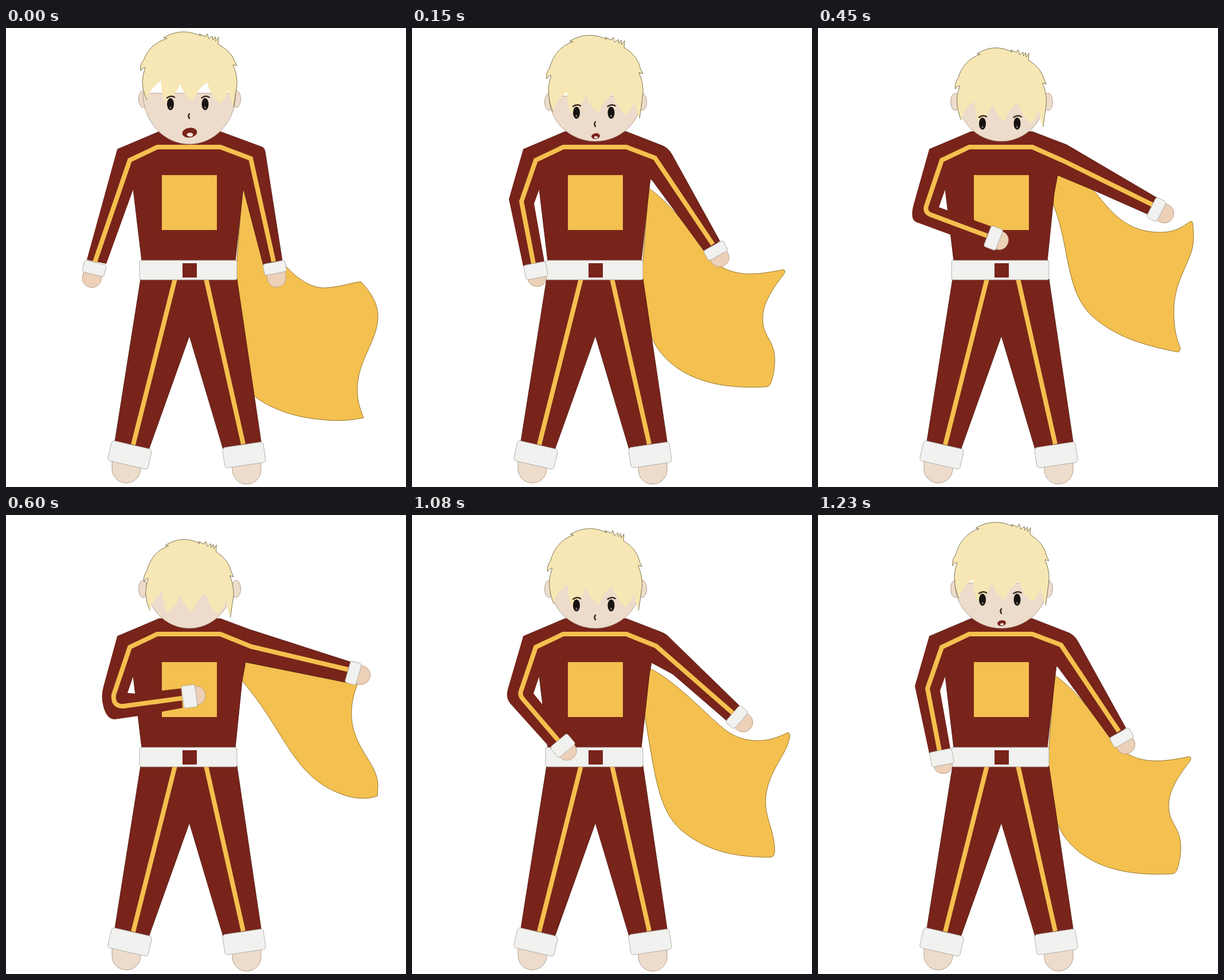
Write an HTML page that moves like this. It is 698x802 px and loops after 1380 ms.

```html
<!DOCTYPE html>
<html lang="en">
<head>
<meta charset="utf-8">
<title>Caped hero</title>
<style>
  html, body { margin: 0; width: 100%; height: 100%; overflow: hidden; background: #fff; }
  svg { display: block; width: 100%; height: 100%; }
  .suit { fill: #78241a; stroke: #4d130d; stroke-width: .8; }
  .stripe { fill: none; stroke: #f4c04f; stroke-width: 8; }
  .cape { fill: #f4c04f; stroke: #8a6a24; stroke-width: .9; }
  .white { fill: #f1f1ef; stroke: #a5a39f; stroke-width: .8; }
  .skin { fill: #eddccb; stroke: #a08b79; stroke-width: .8; }
  .hand { fill: #ecd0b7; stroke: #b3977f; stroke-width: .8; }
  .hair { fill: #f7e7b4; }
  .edge { fill: none; stroke: #7d7453; stroke-width: 1; }
  .brow { fill: none; stroke: #3b2b24; stroke-width: 2.6; stroke-linecap: round; }
</style>
</head>
<body>
<svg id="stage" viewBox="0 0 698 802"></svg>
<script>
const STEP = 150, LOOP = 1380;

// Cuffs are [x, y, angle, thickness, hand reach].
const poses = [
  {
    cape: 'M413,278 L470,400 L490,418 C515,445 540,455 556,454 C580,453 600,446 619,443 C640,465 650,485 649,507 C647,550 613,580 613,633 C613,655 620,670 624,681 C600,686 580,687 560,685 C510,682 465,668 433,643 L400,440Z',
    left: 'L141,405 L175,412', leftStripe: 'M155,409 L216,231', leftCuff: [154, 420, 104, 21, 34],
    right: 'M374,181 L447,208 Q451,210 452,215 L482,406 L449,414 L414,280', rightEnd: '427,228 L467,408', rightCuff: [469, 419, 79, 20, 34],
    hair: [1, 0, 0, 0], ear: 124, chin: 203, eyes: 133, nose: 154, mouth: [183, 13, 8.5]
  },
  {
    cape: 'M413,280 C440,298 470,333 490,362 C505,384 520,408 545,420 C575,434 605,431 648,422 Q653,424 649,430 C630,455 612,480 612,508 C612,540 633,545 633,580 C633,600 629,612 626,621 Q623,627 618,627 C580,629 540,627 505,615 C460,600 430,570 418,540 L401,430Z',
    left: 'L169,299 L194,416 L231,408 L213,307', leftStripe: 'M212,412 L191,303 L216,231', leftCuff: [216, 424, 79, 26, 28],
    right: 'M374,181 L438,206 Q447,210 453,220 L537,372 L511,391 L419,266 L416,264 L414,280', rightEnd: '424,227 L525,378', rightCuff: [530, 389, 61, 20, 30],
    hair: [1, 6, 14, 20], ear: 129, chin: 198, eyes: 148, nose: 168, mouth: [189, 7.5, 5]
  },
  {
    cape: 'M415,268 C460,290 510,345 540,370 C565,392 590,395 610,394 C630,393 645,385 656,380 Q660,381 659,388 C654,420 622,445 617,495 C615,530 633,550 633,588 Q632,598 625,598 C570,598 520,590 475,555 C430,520 425,460 406,350Z',
    left: 'L167,305 Q163,320 172,330 L243,409 L272,385 L212,312', leftStripe: 'M258,397 L193,321 Q188,315 190,308 L216,231', leftCuff: [263, 403, 50, 24, 28],
    right: 'M374,181 L436,205 Q444,208 450,215 L573,335 L551,361 L455,278 L418,258 L414,280', rightEnd: '426,229 L562,348', rightCuff: [567, 353, 41, 20, 31],
    hair: [.98, 17, 24, 29], ear: 129, chin: 198, eyes: 158, nose: 179, mouth: null
  },
  {
    cape: 'M418,257 L480,283 C505,310 530,357 597,357 C625,357 640,345 649,338 Q654,337 654,343 C656,360 656,375 652,390 C640,425 621,450 621,495 C621,530 627,545 632,558 Q632,567 627,566 C570,555 520,540 480,505 C430,460 440,380 411,310 L409,300Z',
    left: 'L167,308 Q160,334 171,339 L288,382 L303,347 L211,313', leftStripe: 'M295,363 L196,326 Q186,322 189,311 L216,231', leftCuff: [306, 367, 21, 22, 27],
    right: 'M374,181 L434,204 L592,297 L577,326 L480,283 L418,257 L412,290', rightEnd: '428,232 L584,309', rightCuff: [590.5, 317, 27, 20, 32],
    hair: [.945, 28, 32, 35], ear: 129, chin: 198, eyes: 167
  },
  {
    cape: 'M417,257 L590,292 L613,296 C600,330 600,360 610,385 C622,420 648,440 649,472 L648,491 C630,497 612,496 595,491 C500,462 490,380 412,290Z',
    left: 'L170,300 Q165,318 170,335 Q176,357 190,357 L232,351 L308,337 L306,303 L226,312 L212,311', leftStripe: 'M308,320 L205,334 Q186,335 188,314 L216,231', leftCuff: [320, 317, -8, 24, 28],
    right: 'M374,181 L425,200 L602,257 L592,292 L418,257 L412,290', rightEnd: '428,230 L597,270', rightCuff: [606, 276, 16, 20, 30],
    hair: [.93, 36, 42, 41], ear: 129, chin: 198
  }
];

const path = (cls, d) => `<path class="${cls}" d="${d}"/>`;
const ellipse = (x, y, rx, ry, attrs) => `<ellipse cx="${x}" cy="${y}" rx="${rx}" ry="${ry}" ${attrs}/>`;
const rect = (x, y, w, h, rx, attrs) => `<rect x="${x}" y="${y}" width="${w}" height="${h}" rx="${rx}" ${attrs}/>`;

const hand = ([x, y, angle, depth, reach]) =>
  `<g transform="translate(${x} ${y}) rotate(${angle})">
    ${rect(-4, -16.5, reach + 4, 33, 16, 'class="hand"')}
    ${rect(-depth / 2, -19.5, depth, 39, 4, 'class="white"')}
  </g>`;

const foot = (x, cuffX, angle, bottom) =>
  rect(x - 25, bottom - 60, 50, 60, 25, 'class="skin"') +
  `<g transform="translate(${cuffX} 746) rotate(${angle})">${rect(-36, -18, 72, 36, 5, 'class="white"')}</g>`;

// Crown, sides and fringe sink by different amounts as the head bows.
function hair([scale, crown, side, fringe]) {
  const shift = dy => (x, y) => `${(318.5 + (x - 318.5) * scale).toFixed(1)},${y + dy} `;
  const c = shift(crown), s = shift(side), f = shift(fringe);
  const outline =
    'M' + f(246, 126) + 'Q' + f(239, 112) + s(238, 95) + 'Q' + s(238, 83) + s(243, 69) + 'Q' + s(239, 68) + s(235, 75) +
    'Q' + s(233, 65) + s(240, 56) + 'Q' + c(250, 28) + c(281, 18) + 'L' + c(275, 17) +
    'Q' + c(307, -2) + c(340, 14) + 'L' + c(337, 10) + c(348, 15) + c(351, 10) + c(354, 19) + c(360, 14) +
    c(361, 21) + c(365, 15) + c(366, 23) + c(371, 16) + c(370, 28) +
    'Q' + c(394, 42) + s(399, 58) + 'L' + s(403, 66) + s(396, 64) + 'Q' + s(404, 82) + s(403, 100) +
    'L' + f(400, 118) + f(397, 138);
  const strands =
    'Q' + f(391, 125) + f(389, 107) + 'Q' + f(384, 122) + f(374, 132) +
    'Q' + f(357, 119) + f(351, 95) + 'Q' + f(333, 107) + f(326, 128) +
    'Q' + f(310, 119) + f(304, 97) + 'Q' + f(294, 122) + f(278, 129) +
    'Q' + f(270, 112) + f(271, 92) + 'Q' + f(251, 105) + f(246, 126) + 'Z';
  return path('hair', outline + strands) + path('edge', outline);
}

// Only the lower half of the face shows below the hair.
function face({ ear, chin, hair: [scale] }) {
  const y = ear - 10, rx = 81 * scale;
  return path('skin', `M${320 - rx},${y} A${rx},${chin - y} 0 0 0 ${320 + rx},${y}Z`);
}

const eye = (x, y) =>
  ellipse(x, y, 6, 10.5, 'fill="#171310"') +
  ellipse(x, y + 6, 1.6, 2, 'fill="#77706a"') +
  path('brow', `M${x - 6},${y - 11} q7,-5 13,-1`);

function head(p) {
  const ear = x => ellipse(x, p.ear, 8, 15, 'class="skin"');
  let out = ear(239.5) + ear(401.5) + face(p) + hair(p.hair);
  if (p.eyes) out += eye(287, p.eyes) + eye(347.5, p.eyes);
  if (p.nose) out += path('brow', `M320,${p.nose - 4} q-3,4 0,8`);
  if (p.mouth) {
    const [y, rx, ry] = p.mouth;
    out += ellipse(320.5, y, rx, ry, `fill="#78241a" transform="rotate(-8 320 ${y})"`) +
      ellipse(321, y + ry * .4, rx * .42, ry * .4, 'fill="#f3e4dc"');
  }
  return out;
}

const lower = path('suit', 'M235,438 L190,722 L186,740 L248,740 L320,538 L378,733 L382,745 L445,735 L445,722 L403,438Z') +
  path('stripe', 'M295,438 L222,728 M349,438 L414,727') +
  foot(210, 216, 13, 795) + foot(420, 415.5, -8.5, 797);

const belt = rect(233, 406, 170, 34, 3, 'class="white"') + rect(308, 411, 25, 25, 0, 'fill="#78241a"');
const badge = rect(272, 257, 96, 96, 0, 'fill="#f4c04f"');

const figure = p => '<g visibility="hidden">' +
  path('cape', p.cape) + lower +
  path('suit', `${p.right} L400,408 L237,408 L222,282 L215,230 L194,212 L267,181Z`) +
  badge + belt +
  `<path fill="#78241a" d="M194,212 ${p.left} L222,282 L240,230Z"/>` +
  path('stripe', `${p.leftStripe} L264,208 L374,208 L${p.rightEnd}`) +
  hand(p.leftCuff) + hand(p.rightCuff) + head(p) + '</g>';

const stage = document.getElementById('stage');
stage.innerHTML = poses.map(figure).join('');
const layers = [...stage.children];

function draw() {
  const t = performance.now() % LOOP;
  const current = Math.min(4, Math.floor(t / STEP), Math.ceil((LOOP - t) / STEP));
  layers.forEach((g, i) => g.setAttribute('visibility', i === current ? 'visible' : 'hidden'));
  requestAnimationFrame(draw);
}
draw();
</script>
</body>
</html>
```
